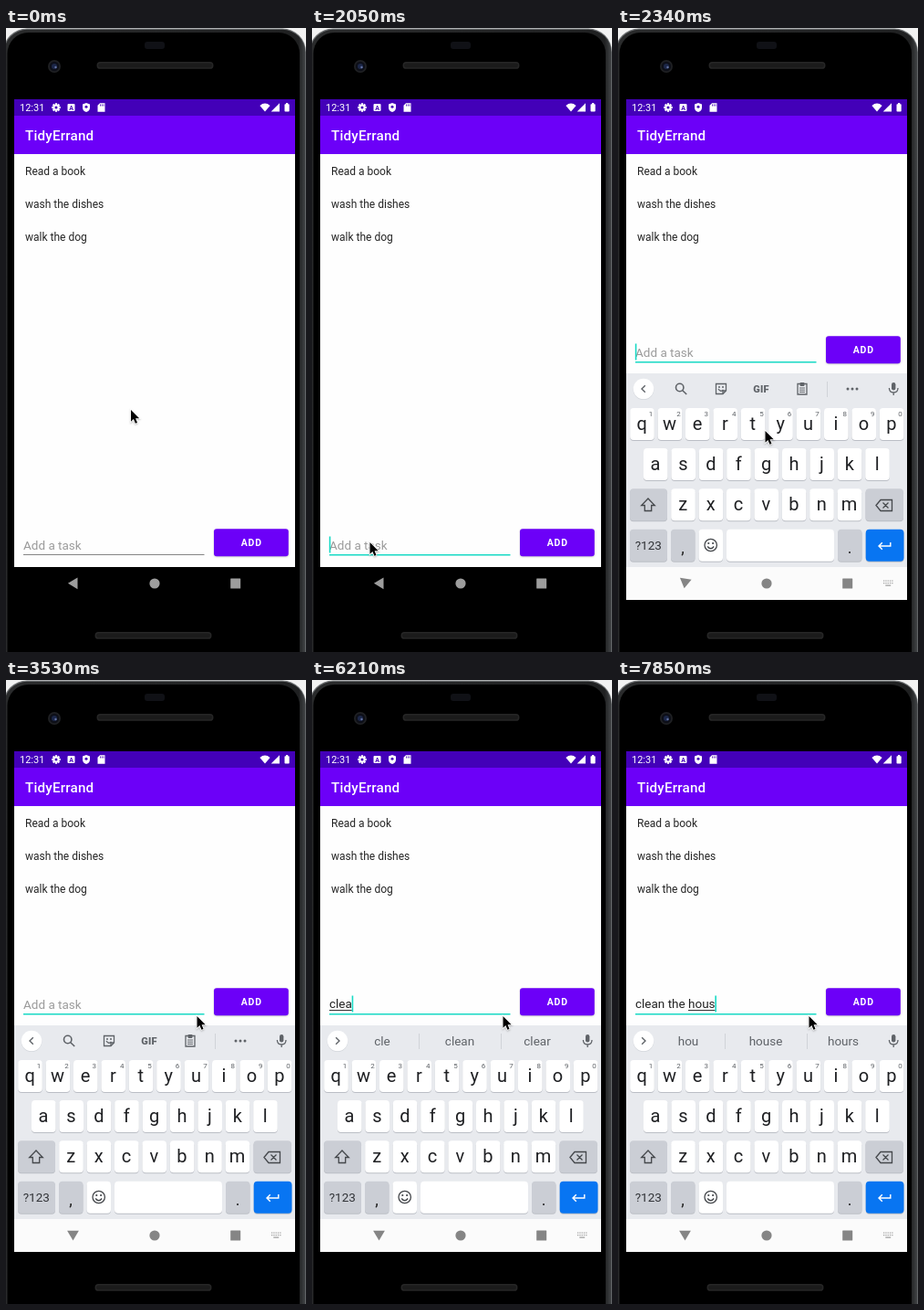
Recreate the animation shown at these times as an HTML page with a canvas. Size 329 by 683 pixels, loop 7.99 s.

```html
<!DOCTYPE html>
<html lang="en">
<head>
<meta charset="utf-8">
<title>Task list on a phone</title>
<style>
html, body { margin: 0; width: 100%; height: 100%; overflow: hidden; background: #f2f2f2; }
canvas { display: block; width: 329px; height: 683px; }
</style>
</head>
<body>
<canvas id="stage"></canvas>
<script>
const W = 329, H = 683, LOOP = 7990;
const canvas = document.getElementById('stage');
const ctx = canvas.getContext('2d');
const ratio = window.devicePixelRatio || 1;
canvas.width = W * ratio;
canvas.height = H * ratio;

const PURPLE = '#6c00f8', TEAL = '#18dac5', ICON = '#5f6368';
const FIELD_X = 19, LIFT = 211;

// Each entry holds from its start time until the next one.
const pointer = [
  [0, 137, 418], [290, 133, 407], [440, 116, 428], [590, 84, 480], [730, 46, 545],
  [880, 27, 580], [1020, 47, 573], [1170, 63.5, 563], [2200, 98, 520],
  [2340, 161.5, 441], [2490, 207, 368], [2630, 209.5, 368]
];
const caretStates = [
  [0, false], [1610, true], [2490, false], [2930, true], [3530, false],
  [3980, true], [4420, false], [5020, true]
];
const typing = [
  [0, ''], [5470, 'c'], [5620, 'cl'], [6060, 'cle'], [6210, 'clea'], [6510, 'clean '],
  [6660, 'clean t'], [6810, 'clean th'], [6960, 'clean the'], [7110, 'clean the '],
  [7250, 'clean the h'], [7400, 'clean the ho'], [7700, 'clean the hou'],
  [7850, 'clean the hous']
];
const hints = [
  [0, ''], [5620, 'c can call'], [5760, 'cl clean clear'], [6210, 'cle clean clear'],
  [6510, 'clean cleaned cleaner'], [6660, 'the up my'], [6810, 't the them'],
  [6960, 'th the them'], [7110, 'the them then'], [7250, 'house room kitchen'],
  [7400, 'h house home'], [7550, 'ho house holiday'], [7850, 'hou house hours']
];

const at = (list, t) => list.findLast(step => step[0] <= t);

function box(x, y, w, h, color, r = 0) {
  ctx.fillStyle = color;
  ctx.beginPath();
  ctx.roundRect(x, y, w, h, r);
  ctx.fill();
}

function dot(x, y, r, color) {
  ctx.fillStyle = color;
  ctx.beginPath();
  ctx.arc(x, y, r, 0, Math.PI * 2);
  ctx.fill();
}

function fillPath(d, x, y, color) {
  ctx.save();
  ctx.translate(x, y);
  ctx.fillStyle = color;
  ctx.fill(new Path2D(d));
  ctx.restore();
}

function strokePath(d, x, y, color, width = 1.3) {
  ctx.save();
  ctx.translate(x, y);
  ctx.strokeStyle = color;
  ctx.lineWidth = width;
  ctx.stroke(new Path2D(d));
  ctx.restore();
}

function text(str, x, y, size, color, { weight = 400, align = 'left', gap = 0 } = {}) {
  ctx.font = `${weight} ${size}px Roboto, sans-serif`;
  ctx.letterSpacing = gap + 'px';
  ctx.textAlign = align;
  ctx.fillStyle = color;
  ctx.fillText(str, x, y);
}

function drawBody() {
  box(0, 0, W, H, '#f2f2f2');
  box(-3, 0.5, 332, 720, '#6f7274', 26);
  const rim = ctx.createLinearGradient(0, 0, W, 0);
  rim.addColorStop(0, '#2a2b2c');
  rim.addColorStop(0.975, '#1f2021');
  rim.addColorStop(1, '#45484a');
  box(-2, 1.8, 330.3, 720, rim, 25);
  box(1.5, 5, 320.5, 720, '#000', 23);

  box(152, 15, 22, 8, '#101116', 3);
  dot(53, 42, 7, '#1f2023');
  dot(53, 42, 5.2, '#0d0f18');
  dot(53, 42, 3, '#1c2748');
  dot(54.5, 43, 1.2, '#6474a4');
  for (const [x, y] of [[99.5, 37], [97.5, 661]]) {
    box(x, y, 128, 7.8, '#262626', 4);
    box(x + 1.5, y + 1.5, 125, 4.8, '#1b1b1b', 3);
  }
}

function drawStatus() {
  box(9, 78, 308, 18, '#4300b8');
  text('12:31', 15, 91.2, 11, '#fff');
  for (let i = 0; i < 8; i++) {
    ctx.save();
    ctx.translate(55, 87);
    ctx.rotate(i * Math.PI / 4);
    box(-1.1, -4.8, 2.2, 3, '#fff');
    ctx.restore();
  }
  dot(55, 87, 3.6, '#fff');
  dot(55, 87, 1.5, '#4300b8');
  box(67.5, 83, 8, 8, '#fff', 1);
  text('A', 71.5, 89.5, 7, '#4300b8', { weight: 700, align: 'center' });
  fillPath('M0-5L4-3.4V0Q4 3.8 0 5Q-4 3.8-4 0V-3.4Z', 88, 87, '#fff');
  dot(88, 86.3, 1.5, '#4300b8');
  fillPath('M-1.5-4.8H4V4.8H-4V-2.2Z', 104.5, 87, '#fff');
  for (let i = 0; i < 3; i++) box(103 + i * 1.8, 83.5, 0.8, 2, '#4300b8');
  fillPath('M0 4.6L-5.6-2Q0-6.8 5.6-2Z', 284, 87, '#fff');
  fillPath('M4.5-4.8V4.5H-4.8Z', 295.5, 87, '#fff');
  box(305.5, 83.2, 5.2, 8.4, '#fff', 0.8);
  box(307, 82, 2.2, 2, '#fff');
}

function drawApp() {
  box(9, 138, 308, 452, '#fefefe');
  box(9, 96, 308, 42, PURPLE);
  text('TidyErrand', 21, 123, 15.2, '#fff', { weight: 500, gap: 0.2 });
  ['Read a book', 'wash the dishes', 'walk the dog'].forEach((task, i) =>
    text(task, 21, 160.5 + i * 36, 12, '#242424'));
}

function drawField(t, open) {
  const dy = open ? -LIFT : 0;
  const focused = t >= 1460;
  const str = at(typing, t)[1];
  if (!str) text('Add a task', FIELD_X, 570.5 + dy, 13.5, '#9b9b9b');
  text(str, FIELD_X, 570 + dy, 13.5, '#222');
  const end = str ? FIELD_X + ctx.measureText(str).width : FIELD_X;
  const word = str.split(' ').pop();
  if (word && str.length > 1) {
    const len = ctx.measureText(word).width;
    box(end - len, 572 + dy, len, 1, '#333');
  }
  if (focused) box(FIELD_X, 576 + dy, 198.5, 1.6, TEAL);
  else box(FIELD_X, 576, 198.5, 1, '#858585');
  if (at(caretStates, t)[1]) box(end - 0.2, 556.5 + dy, 1.6, 18, TEAL);

  ctx.save();
  ctx.shadowColor = 'rgba(0,0,0,.22)';
  ctx.shadowBlur = 2 * ratio;
  ctx.shadowOffsetY = ratio * 0.7;
  box(228, 548.2 + dy, 81.8, 30, PURPLE, 3);
  ctx.restore();
  text('ADD', 269.3, 567.3 + dy, 10.5, '#fff', { weight: 700, align: 'center', gap: 0.8 });
}

function drawToolbar() {
  strokePath('M1.8-3.8L-2 0L1.8 3.8', 28, 395, ICON, 1.4);
  ctx.strokeStyle = ICON;
  ctx.lineWidth = 1.6;
  ctx.beginPath();
  ctx.arc(67.7, 393.5, 4.2, 0, Math.PI * 2);
  ctx.moveTo(70.8, 396.7);
  ctx.lineTo(75.2, 401);
  ctx.stroke();
  strokePath('M-5.5-5.5H5.5V2L2 5.5H-5.5ZM5.5 2H2V5.5M-3 0Q-.5 4 2.5 1', 113, 395, ICON);
  dot(111, 393, 1, ICON);
  dot(115, 393, 1, ICON);
  text('GIF', 157, 399, 11, ICON, { weight: 800, align: 'center', gap: 0.2 });
  strokePath('M-5-5.5H5V6H-5Z', 202, 395, ICON);
  box(199.5, 388, 5, 4, ICON, 1);
  for (let i = 0; i < 3; i++) box(199, 393.5 + i * 2.2, 6, 1, ICON);
  box(229, 387, 1, 17, '#d0d3d8');
  for (const x of [252, 257, 262]) dot(x, 395, 1.5, ICON);
}

function drawHints(line) {
  strokePath('M-1.8-3.8L2 0L-1.8 3.8', 28, 395, ICON, 1.4);
  line.split(' ').forEach((word, i) =>
    text(word, 77 + i * 85, 399.8, 13.5, ICON, { align: 'center' }));
  box(117, 387, 1, 17, '#d0d3d8');
  box(207, 387, 1, 17, '#d0d3d8');
}

function key(x, y, w, color = '#fff') {
  box(x, y + 1, w, 35, '#bbbec5', 4);
  box(x, y, w, 35, color, 4);
}

function letterRow(letters, x, y) {
  [...letters].forEach((ch, i) => {
    const cx = x + i * 30.4;
    key(cx - 13.3, y, 26.6);
    text(ch, cx - 0.3, y + 24, 20, '#1f2023', { align: 'center' });
  });
}

function drawKeys() {
  const grey = '#cbced5';
  letterRow('qwertyuiop', 26.5, 416);
  [...'1234567890'].forEach((n, i) =>
    text(n, 36 + i * 30.4, 425.3, 8, ICON, { align: 'center' }));
  letterRow('asdfghjkl', 41.3, 460);
  letterRow('zxcvbnm', 71.5, 504.3);

  key(13, 504.3, 41, grey);
  strokePath('M0-7.5L7.3 0H3.7V6H-3.7V0H-7.3Z', 33, 522.5, '#44474b');
  key(271.5, 504.3, 41.5, grey);
  strokePath('M-9 0L-4-6H8.5V6H-4ZM-1.5-3L4.5 3M4.5-3L-1.5 3', 292, 522.5, '#44474b');

  const y = 548.7;
  key(13, y, 41, grey);
  text('?123', 33.3, 571, 13.5, '#303236', { align: 'center' });
  key(58, y, 26.5, grey);
  text(',', 71, 574.5, 18, '#222', { align: 'center' });
  key(88.5, y, 26.5);
  ctx.strokeStyle = '#44474b';
  ctx.lineWidth = 1.3;
  ctx.beginPath();
  ctx.arc(101.7, 566, 6.7, 0, Math.PI * 2);
  ctx.stroke();
  dot(99.3, 564, 1.1, '#44474b');
  dot(104.1, 564, 1.1, '#44474b');
  strokePath('M-3.5 1.5Q0 6 3.5 1.5', 101.7, 566, '#44474b');
  key(119, y, 118);
  key(241, y, 26.5, grey);
  text('.', 254.2, 574.5, 18, '#222', { align: 'center' });
  key(271.7, y, 41.8, '#0875f2');
  strokePath('M6.5-4V0H-6M-2.5-3.8L-6.3 0L-2.5 3.8', 292.3, 567, '#fff', 1.4);
}

function drawKeyboard(t) {
  ctx.save();
  ctx.beginPath();
  ctx.rect(9, 378, 308, 212);
  ctx.clip();
  if (t < 2340) ctx.translate(0, 70);
  box(9, 378, 308, 212, '#e8eaee');
  dot(28, 395.7, 11.3, '#d1d4d9');
  dot(28, 395, 11.2, '#fff');
  const line = at(hints, t)[1];
  if (line) drawHints(line);
  else drawToolbar();
  box(300, 388, 4.4, 8.5, ICON, 2.2);
  strokePath('M-4.8-1Q-4.8 4 0 4Q4.8 4 4.8-1M0 4V7', 302.2, 395, ICON);
  drawKeys();
  ctx.restore();
}

function drawNav(t, open) {
  const color = open ? '#858585' : '#9d9d9d';
  box(9, 590, 308, 36, open ? '#fbfbfb' : '#000');
  const turn = !open ? 0 : t < 2340 ? 0.45 : t < 2490 ? 0.9 : 1;
  ctx.save();
  ctx.translate(73.5, 607.8);
  ctx.rotate(-turn * Math.PI / 2);
  fillPath('M-5.6 0L5-6.4V6.4Z', 0, 0, color);
  ctx.restore();
  dot(163, 608, 5.6, color);
  box(246.2, 602.4, 11, 11, color, 0.5);
  if (open) {
    const faint = '#a3a3a3';
    for (let row = 0; row < 2; row++)
      for (let i = 0; i < 5; i++) box(291 + i * 2.3, 604.5 + row * 2.4, 1.3, 1.3, faint);
    box(293.3, 609.5, 5.9, 1.3, faint);
  }
}

function drawPointer(t) {
  const [, x, y] = at(pointer, t);
  const arrow = 'M0 0V12.8L2.9 10.1L4.9 14.8L7 13.9L5.1 9.3H9.2Z';
  ctx.save();
  ctx.shadowColor = 'rgba(0,0,0,.25)';
  ctx.shadowBlur = 2 * ratio;
  ctx.shadowOffsetY = ratio;
  strokePath(arrow, x, y, '#fff', 1.6);
  ctx.restore();
  fillPath(arrow, x, y, '#000');
}

function frame() {
  const t = performance.now() % LOOP;
  const open = t >= 2200;
  ctx.setTransform(ratio, 0, 0, ratio, 0, 0);
  drawBody();
  drawStatus();
  drawApp();
  drawField(t, open);
  if (open) drawKeyboard(t);
  drawNav(t, open);
  drawPointer(t);
  requestAnimationFrame(frame);
}
frame();
</script>
</body>
</html>
```
